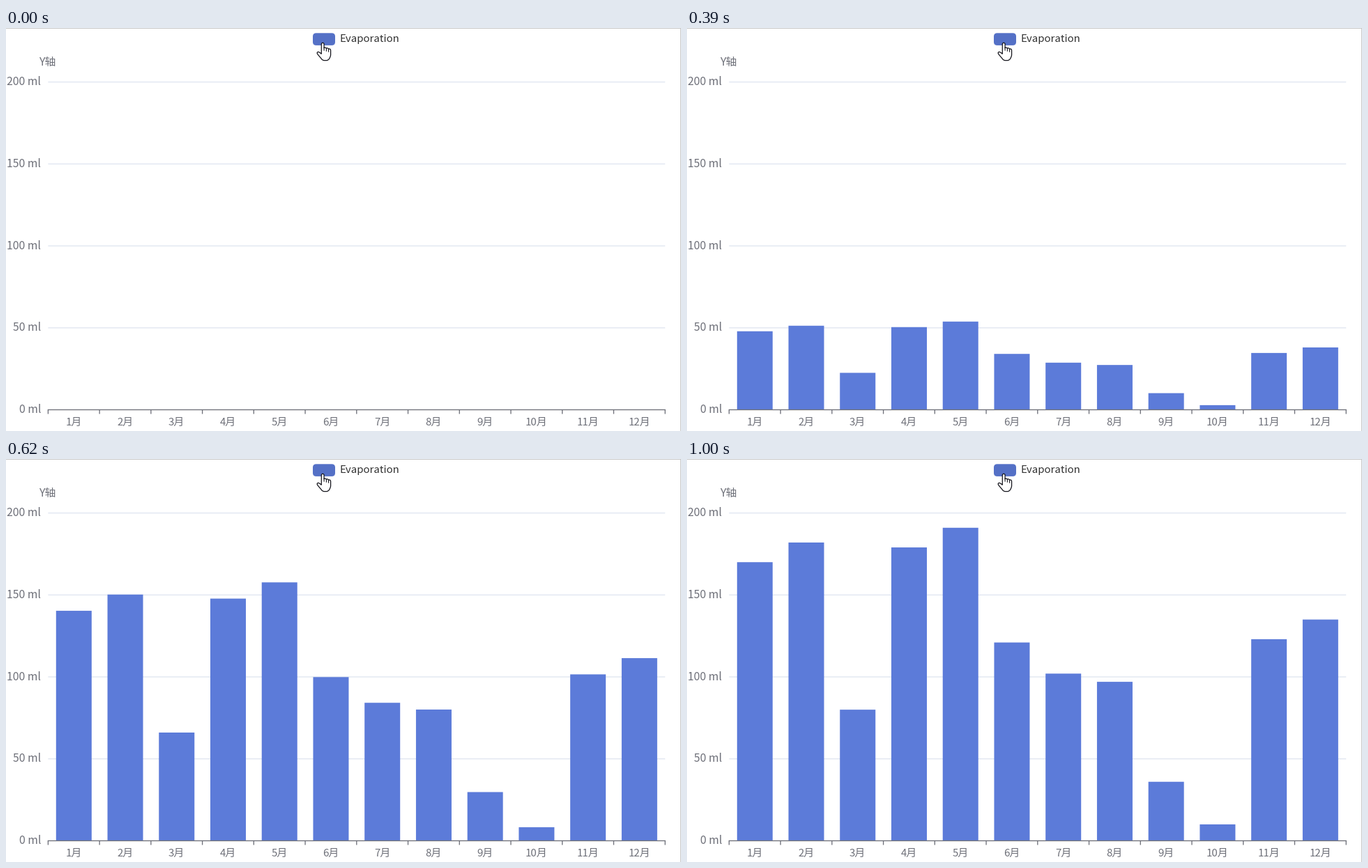
A matplotlib script that plays this animation: 968 px wide and 579 px high, repeating every 2850 ms.

```python
import numpy as np
import matplotlib.pyplot as plt
from matplotlib.animation import FuncAnimation
from matplotlib.patches import FancyBboxPatch, PathPatch, Rectangle
from matplotlib.path import Path

WIDTH, HEIGHT, DPI = 968, 579, 64
LOOP_MS, TICK_MS = 2850, 10
FONT = "Noto Sans CJK JP"
AXIS, GRID, BAR, LEGEND = "#6e7079", "#e0e6f1", "#5c7bd9", "#5470c6"

LEFT, RIGHT, TOP, BASE = 60.4, 945.2, 77.6, 548.5
BAND = (RIGHT - LEFT) / 12
BAR_INSET, BAR_WIDTH = 11.4, 51
UNIT = (BASE - TOP) / 200
VALUES = np.array([170, 182, 80, 179, 191, 121, 102, 97, 36, 10, 123, 135])

# The bars refresh at these times, each showing this share of the tween.
REFRESH_MS = [0, 90, 170, 230, 310, 390, 470, 540, 620, 700, 770, 850, 1000]
PROGRESS = [0, .09, .172, .255, .338, .413, .489, .572, .648, .724, .81, .955, 1]


def px(size):
    return size * 72 / DPI


def cubic_in_out(k):
    return 4 * k**3 if k < .5 else 1 - 4 * (1 - k)**3


fig = plt.figure(figsize=(WIDTH / DPI, HEIGHT / DPI), dpi=DPI, facecolor="white")
ax = fig.add_axes([0, 0, 1, 1])
ax.set_xlim(0, WIDTH)
ax.set_ylim(HEIGHT, 0)
ax.axis("off")


def line(x0, y0, x1, y1, color, width=1.33, z=1):
    ax.plot([x0, x1], [y0, y1], color=color, lw=px(width), zorder=z,
            solid_capstyle="butt", snap=False)


def label(x, y, text, size, color=AXIS, ha="center"):
    ax.text(x, y, text, fontsize=px(size), color=color, ha=ha,
            va="baseline", family=FONT)


def draw_axes():
    line(0, .5, WIDTH, .5, "#c8c8c8", 1)
    line(967.5, 0, 967.5, HEIGHT, "#c8c8c8", 1)
    for value in range(0, 201, 50):
        y = BASE - value * UNIT
        if value:
            line(LEFT, y, RIGHT, y, GRID)
        label(50, y + 4.5, f"{value} ml", 15.8, ha="right")
    line(LEFT - .6, BASE, RIGHT + .6, BASE, AXIS, z=4)
    for i in range(13):
        x = LEFT + i * BAND
        line(x, BASE, x, BASE + 6, AXIS, z=4)
        if i < 12:
            label(x + BAND / 2, 571, f"{i + 1}月", 15)
    label(60.5, 54, "Y轴", 15.8)


def draw_legend():
    ax.add_patch(FancyBboxPatch((440, 7.3), 32, 17.6, fc=LEGEND, ec="none",
                                boxstyle="round,pad=0,rounding_size=4.8"))
    label(478, 20, "Evaporation", 15, "#333333", "left")


def draw_hand():
    M, L, Q = Path.MOVETO, Path.LINETO, Path.CURVE3
    steps = [(M, 452.3, 37.3), (L, 452.3, 23.4),
             (Q, 452.3, 21.3), (Q, 454.2, 21.3), (Q, 456.1, 21.3), (Q, 456.1, 23.4),
             (L, 456.1, 28.6), (Q, 457.8, 27), (Q, 459.4, 29.2),
             (Q, 461.2, 27.8), (Q, 462.6, 30.2), (Q, 465.5, 29.2), (Q, 465.6, 32.5),
             (L, 465.6, 38.5), (Q, 465.4, 41.5), (Q, 463.6, 44),
             (Q, 462.4, 46.6), (Q, 459.5, 46.6), (L, 456.3, 46.6),
             (Q, 453.6, 46.6), (Q, 452, 43.8), (L, 446.8, 37.6),
             (Q, 445.2, 35), (Q, 447.4, 34.4), (Q, 449.2, 34), (Q, 452.3, 37.3)]
    outline = Path([s[1:] for s in steps], [s[0] for s in steps])
    ax.add_patch(PathPatch(outline, fc="white", ec="#15151c", lw=px(1.25),
                           joinstyle="round", zorder=5))
    for x, y in [(456.1, 28), (459.4, 29), (462.6, 30)]:
        line(x, y, x, y + 4.6, "#15151c", 1.1, 6)


draw_axes()
draw_legend()
draw_hand()
bars = [ax.add_patch(Rectangle((LEFT + i * BAND + BAR_INSET, BASE), BAR_WIDTH, 0,
                               fc=BAR, ec="none", zorder=3, snap=False))
        for i in range(12)]


def update(frame):
    step = np.searchsorted(REFRESH_MS, frame * TICK_MS, side="right") - 1
    grown = cubic_in_out(PROGRESS[step])
    for bar, value in zip(bars, VALUES):
        bar.set_height(-value * UNIT * grown)
    return bars


anim = FuncAnimation(fig, update, frames=LOOP_MS // TICK_MS, interval=TICK_MS,
                     init_func=lambda: update(0), repeat=True, repeat_delay=0)
plt.show()
```
